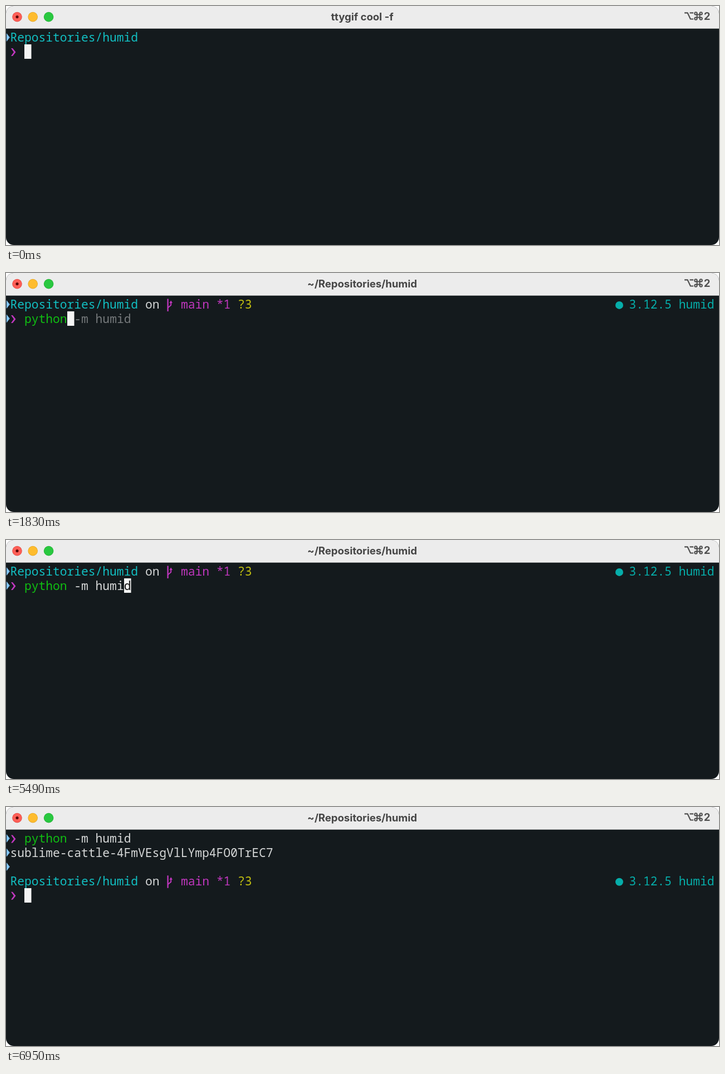
Recreate the animation shown at these times as an HTML page with a canvas. Size 1280x430 px, loop 8 s.

```html
<!DOCTYPE html>
<html lang="en">
<head>
<meta charset="utf-8">
<title>Terminal</title>
<style>
  html, body { margin: 0; width: 1280px; height: 430px; overflow: hidden; background: #fff; }
  canvas { display: block; }
</style>
</head>
<body>
<canvas id="stage" width="1280" height="430"></canvas>
<script>
const g = document.getElementById('stage').getContext('2d');
const LOOP = 8000;
const CELL = 12.77, LEFT = 7.4, TOP = 43.9, ROW = 25.6;
const MONO = '21.28px "Noto Sans Mono", "DejaVu Sans Mono", monospace';
const SANS = 'bold 18.5px Inter, "Liberation Sans", sans-serif';
const C = {
  bg: '#141a1d', text: '#d6d8d8', cyan: '#12bfc2', teal: '#06aeaa', magenta: '#c137bf',
  yellow: '#c3c010', green: '#10bf12', red: '#e2766f', ghost: '#75797b', cursor: '#f4f4f4', mark: '#82c4f8'
};

const COMMAND = 'python -m humid';
const KEYS = [80, 560, 820, 1250, 1540, 1830, 2710, 3610, 4290, 4590, 4830, 5120, 5370, 5490, 5660];
const PROMPT_READY = 20, SUGGEST = 140, ENTER = 6610, RUN = 6710, OUTPUT = 6750, DONE = 6950;

const colX = col => LEFT + col * CELL;
const rowY = row => TOP + row * ROW;

function print(str, col, row, color, bold = false) {
  g.font = (bold ? 'bold ' : '') + MONO;
  g.fillStyle = color;
  g.textAlign = 'left';
  g.fillText(str, colX(col), rowY(row) + 20.1);
}

function disc(x, y, r, color) {
  g.fillStyle = color;
  g.beginPath();
  g.arc(x, y, r, 0, 7);
  g.fill();
}

function line(points, color, width) {
  g.strokeStyle = color;
  g.lineWidth = width;
  g.beginPath();
  points.forEach(([x, y]) => g.lineTo(x, y));
  g.stroke();
}

function polygon(points, color) {
  g.fillStyle = color;
  g.beginPath();
  points.forEach(([x, y]) => g.lineTo(x, y));
  g.fill();
}

function cursor(col, row) {
  g.fillStyle = C.cursor;
  g.fillRect(Math.round(colX(col)), Math.floor(rowY(row)), 12.5, 26);
}

function mark(row) {
  const y = rowY(row) + 5;
  polygon([[1, y], [6.8, y + 7.5], [1, y + 15]], C.mark);
}

function chevron(row) {
  const y = rowY(row) + 13.5;
  polygon([[9, y - 7], [12, y - 7], [17.5, y], [12, y + 7], [9, y + 7], [14, y]], C.magenta);
}

function branch(row) {
  const x = colX(22), y = rowY(row);
  line([[x + 2.2, y + 2.5], [x + 2.2, y + 25]], C.magenta, 2.3);
  line([[x + 2.2, y + 18.5], [x + 7.8, y + 14], [x + 7.8, y + 8]], C.magenta, 1.9);
  polygon([[x + 5, y + 10], [x + 7.8, y + 5.5], [x + 10.6, y + 10]], C.magenta);
}

function pathLine(row, full) {
  print('Repositories/humid', 0, row, C.cyan);
  if (!full) return;
  print('on', 19, row, C.text);
  branch(row);
  print('main *1', 24, row, C.magenta);
  print('?3', 32, row, C.yellow);
  disc(1101, rowY(row) + 14, 7, C.teal);
  print('3.12.5 humid', 87, row, C.teal);
}

function commandLine(row, typed, suggest, showCursor) {
  const known = typed >= 6;
  chevron(row);
  if (showCursor) cursor(2 + typed, row);
  print(COMMAND.slice(0, Math.min(typed, 6)), 2, row, known ? C.green : C.red, !known);
  if (typed > 6) print(COMMAND.slice(6, typed), 8, row, C.text);
  if (!suggest) return;
  print(COMMAND.slice(typed, typed + 1), 2 + typed, row, '#111');
  print(COMMAND.slice(typed + 1), 3 + typed, row, C.ghost);
}

function light(x, fill, edge) {
  disc(x, 19.6, 8.8, edge);
  disc(x, 19.6, 8, fill);
}

function titleBar(title) {
  g.fillStyle = '#ececec';
  g.fillRect(0, 0, 1280, 40);
  g.fillStyle = '#a5a7a8';
  g.fillRect(0, 40, 1280, 1);
  light(20, '#fe5f57', '#e14942');
  disc(20, 19.6, 2.6, '#5c0604');
  light(48.2, '#febc2e', '#e1a325');
  light(76.6, '#29c840', '#24ae36');

  g.font = SANS;
  g.fillStyle = '#454545';
  g.textAlign = 'center';
  g.fillText(title, 639.5, 25.6);
  g.fillStyle = '#505050';
  g.textAlign = 'right';
  g.fillText('2', 1264.5, 24.6);
  shortcutKeys('#505050');
}

function shortcutKeys(color) {
  line([[1218, 12.3], [1223.5, 12.3], [1228.8, 23.5], [1234, 23.5]], color, 2.2);
  line([[1227.5, 12.3], [1234, 12.3]], color, 2.2);
  const x = 1243, y = 18;
  for (const s of [-1, 1]) {
    line([[x + s * 2.4, y - 4.6], [x + s * 2.4, y + 4.6]], color, 2);
    line([[x - 4.6, y + s * 2.4], [x + 4.6, y + s * 2.4]], color, 2);
    for (const v of [-1, 1]) {
      g.beginPath();
      g.arc(x + s * 4.6, y + v * 4.6, 2.2, 0, 7);
      g.stroke();
    }
  }
}

function screen(t) {
  mark(0);
  if (t >= PROMPT_READY) mark(1);
  if (t < RUN) {
    const typed = KEYS.filter(k => t >= k).length;
    pathLine(0, t >= PROMPT_READY);
    commandLine(1, typed, t >= SUGGEST, t < ENTER);
    return;
  }
  commandLine(0, COMMAND.length, false, false);
  if (t < OUTPUT) return cursor(0, 1);
  print('sublime-cattle-4FmVEsgVlLYmp4FO0TrEC7', 0, 1, C.text);
  if (t < DONE) return cursor(0, 2);
  mark(2);
  pathLine(3, true);
  chevron(4);
  cursor(2, 4);
}

function titleAt(t) {
  if (t < PROMPT_READY) return 'ttygif cool -f';
  return t >= RUN && t < DONE ? COMMAND : '~/Repositories/humid';
}

function draw() {
  const t = performance.now() % LOOP;
  g.clearRect(0, 0, 1280, 430);
  g.save();
  g.beginPath();
  g.roundRect(0, 0, 1280, 430, 14);
  g.clip();
  g.fillStyle = C.bg;
  g.fillRect(0, 0, 1280, 430);
  titleBar(titleAt(t));
  screen(t);
  g.restore();
  requestAnimationFrame(draw);
}
draw();
</script>
</body>
</html>
```
